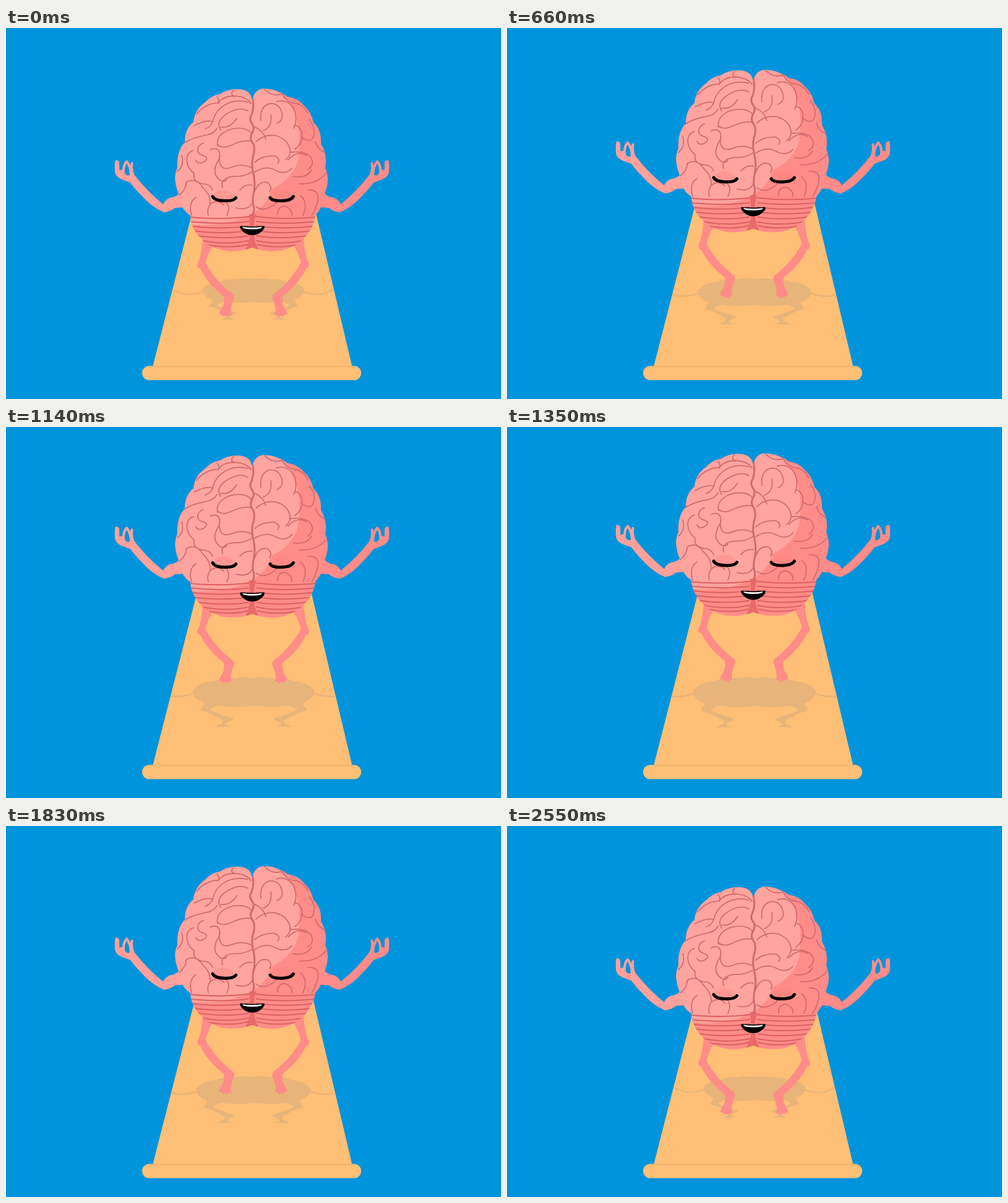
These frames come from a looping animation (800x600 px, 2.58 s). An HTML page:

```html
<!DOCTYPE html>
<html lang="en">
<head>
<meta charset="utf-8">
<title>Levitating brain</title>
<style>
  @property --k { syntax: "<number>"; inherits: true; initial-value: 0; }
  html, body { margin: 0; width: 100%; height: 100%; overflow: hidden; background: #0094dc; }
  svg { display: block; width: 100vw; height: 100vh; animation: float 2580ms -1ms infinite; }
  /* --k counts 60 ms height steps: 21 up, a short hold, then back down */
  @keyframes float {
    0% { --k: 0; animation-timing-function: steps(21); }
    48.8372% { --k: 21; animation-timing-function: step-end; }
    52.3256% { --k: 20; animation-timing-function: steps(20); }
    98.8372%, 100% { --k: 0; animation-timing-function: step-end; }
  }
  .body { transform: translateY(calc(var(--k) * -2.78px)); }
  .shadow {
    fill: #e7b47a;
    transform-origin: 400px 405px;
    transform: scale(calc(.828 + .0086 * var(--k)));
  }
  .light { color: #ffa09a; }
  .dark { color: #ff8c88; }
  .limb { fill: currentColor; }
  .finger, .fold, .stripe, .eye, .shadow-arm { fill: none; stroke-linecap: round; stroke-linejoin: round; }
  .finger { stroke: currentColor; stroke-width: 4; }
  .fold { stroke: #d2696f; stroke-width: 1.7; }
  .stripe { stroke: #dd5f62; stroke-width: 2; }
  .eye { stroke: #000; stroke-width: 5; }
  .shadow-arm { stroke: #e7b47a; stroke-width: 2.6; }
</style>
</head>
<body>
<svg viewBox="0 0 800 600">
  <defs>
    <clipPath id="mat"><path d="M318.5 230H484.4L559 547H238Z"/></clipPath>
    <clipPath id="skull">
      <path d="M398 118Q396 99 374 99Q357 99 346 107Q332 109 322 120Q305 132 303 152Q289 163 289 185Q276 198 277 226
        Q269 243 279 268Q282 294 298 303Q299 326 318 343Q335 359 362 361Q384 361 398 355
        Q412 361 434 361Q461 359 478 343Q497 326 500 303Q514 288 516 265Q524 245 516 226Q520 206 509 187
        Q510 164 497 153Q493 135 481 125Q473 114 455 111Q441 100 419 98Q401 98 398 118Z"/>
    </clipPath>

    <g id="arm">
      <path class="limb" d="M285 261Q279 273 264 275Q257 278 254 285Q228 264 208 238L205 234
        Q199 240 195 238Q191 235 188 229L183 230L176 231Q176 240 187 245L201 250Q208 260 220 272Q236 290 255 298
        Q266 297 273 291L286 290Z"/>
      <path class="finger" d="M178.500 215.500Q177 224 178.500 234M181 217L181.500 234
        M190 235Q189 222 195 216M196 217Q202 226 202 238M203.500 219Q202 228 205.500 238"/>
    </g>

    <path id="leg" class="limb" d="M318 338L337 346Q327 362 322.500 379Q336 407 366 430Q371 435 367 441
      Q364 449 363 457L364 465L360 464L358 468L354 465L351 467L349 464L345 463Q344 459 349 453
      Q354 444 352 434Q326 414 314 389Q309 388 309 382Q316 371 318 338Z"/>

    <path id="stripes" class="stripe" d="M288 305Q345 311 393 305M288 312Q345 319 392 313M288 319Q345 327 392 320
      M288 326Q345 335 392 328M288 332Q345 344 392 336M300 340Q350 353 392 344M310 347Q355 359 391 350"/>

    <g id="shade">
      <path d="M400 406Q385 403 365 407Q350 405 335 411Q316 412 306 421Q299 425 301 432Q305 441 316 445
        Q323 451 345 451Q370 455 400 451Z"/>
      <path d="M321 446L347 450Q330 454 330 459Q343 464 364 471Q370 473 365 475Q354 478 355 482L365 485L338 486
        Q342 482 350 480V475Q336 467 325 462L313 459Z"/>
      <path class="shadow-arm" d="M225 420Q246 428 266 436Q286 437 303 431"/>
    </g>
  </defs>

  <rect width="800" height="600" fill="#0094dc"/>
  <path d="M318.500 230H484.400L560 550H236.500Z" fill="#ffbf76"/>
  <rect x="220" y="546.500" width="354" height="23" rx="11.500" fill="#ffbf76"/>
  <path d="M236 547.500H560" stroke="#efb06b" stroke-width="1.500"/>

  <g clip-path="url(#mat)">
    <g class="shadow">
      <use href="#shade"/>
      <use href="#shade" transform="matrix(-1 0 0 1 800 0)"/>
    </g>
  </g>

  <g class="body">
    <use class="light" href="#arm"/>
    <use class="dark" href="#arm" transform="matrix(-1 0 0 1 795 0)"/>
    <use class="dark" href="#leg"/>
    <use class="dark" href="#leg" transform="matrix(-1 0 0 1 799 0)"/>

    <g clip-path="url(#skull)">
      <rect x="260" y="90" width="270" height="280" fill="#ff8c88"/>
      <path fill="#ffa49e" d="M260 90H414Q449 104 462 128Q475 152 474 188Q475 216 464 232Q450 252 428 261
        Q424 287 394 302Q350 325 290 317L260 300Z"/>
      <path fill="#e96a68" d="M393 301H404Q399 320 401 335Q402 348 408 358H387Q394 345 395 332Z"/>
      <use href="#stripes"/>
      <use href="#stripes" transform="matrix(-1 0 0 1 797 0)"/>

      <path class="fold" d="M341 111Q346 116 343 122M368 101Q361 106 369 111
        M308 139Q322 122 343 121Q352 109 372 110Q390 112 396 122
        M304 158Q326 147 334 152C338 130 362 112 391 120M334 152Q330 161 322 163
        M347 165C338 152 350 141 366 134Q380 128 391 134M347 160Q362 163 373 146
        M342 191C338 173 358 162 376 162Q390 162 397 170M342 189C352 197 362 190 372 186Q384 181 396 183
        M288 186Q300 178 320 174Q336 172 341 162
        M319 186C308 190 306 203 318 206Q330 210 319 217Q310 221 307 214
        M330 197C345 190 350 205 341 218Q332 236 346 246Q353 250 357 245
        M345 206C343 235 360 227 371 223Q385 220 397 226
        M350 258C346 245 358 239 376 240Q390 238 397 233
        M303 198C287 202 290 226 304 235Q301 249 318 252Q330 252 334 262
        M277 232Q289 222 284 206M280 270Q292 260 291 250Q306 240 318 258Q331 270 330 284
        M300 303Q294 282 307 274M327 303C322 284 340 274 352 286M357 303Q363 291 357 283
        M372 291Q392 296 398 283M378 262Q386 252 398 254"/>
      <path class="fold" d="M412 150C408 123 432 114 443 130Q452 148 438 154M428 140Q431 160 416 166
        M437 119Q455 114 465 130Q472 148 465 162M418 99Q430 112 446 107
        M447 108Q454 121 470 122Q482 126 488 138M402 160Q416 166 420 180
        M404 184Q418 171 436 174Q456 180 459 197Q460 207 452 213
        M402 217Q414 206 434 207Q445 212 439 219M402 233Q420 221 437 231Q452 238 462 227
        M467 196Q481 186 478 168Q473 156 466 158M477 176Q496 190 498 170Q499 158 490 148
        M460 201Q482 198 492 208Q500 220 488 229M456 213Q470 197 486 206
        M464 240Q486 244 494 229M474 252Q503 253 517 235M500 184Q505 198 515 201
        M402 264Q409 246 423 250Q431 256 426 264M404 289Q415 297 428 289Q437 285 438 279
        M439 302Q438 290 449 288Q463 291 462 303M480 303Q489 282 476 271
        M488 262Q507 261 504 279Q500 295 494 303"/>
      <path class="fold" style="stroke-width:3" d="M398 112Q402 127 397 140Q392 148 398 155Q403 162 397 171
        Q393 180 400 188Q403 198 399 209Q396 222 400 236Q403 250 401 263Q397 279 400 288Q402 296 398 303"/>
    </g>

    <path fill="#ff9792" d="M334 272Q338 262 351 262Q366 263 369 273Q351 282 334 272Z"/>
    <path fill="#ff8783" d="M429 272Q433 263 446 262Q460 263 463 272Q446 282 429 272Z"/>
    <path class="eye" d="M334 272.500Q337 279 353 279.500Q368 280 371.500 274.500M427 274.500Q430 280 446 279.500Q461 279 464.500 272.500"/>

    <path d="M379 320Q398 322 417 320Q419 322 416 326Q409 335 398 335Q387 335 380 326Q377 322 379 320Z"/>
    <path fill="#fff" d="M382 321.500Q398 324 414 321.500L412 324Q398 327 384 324Z"/>
  </g>
</svg>
</body>
</html>
```
